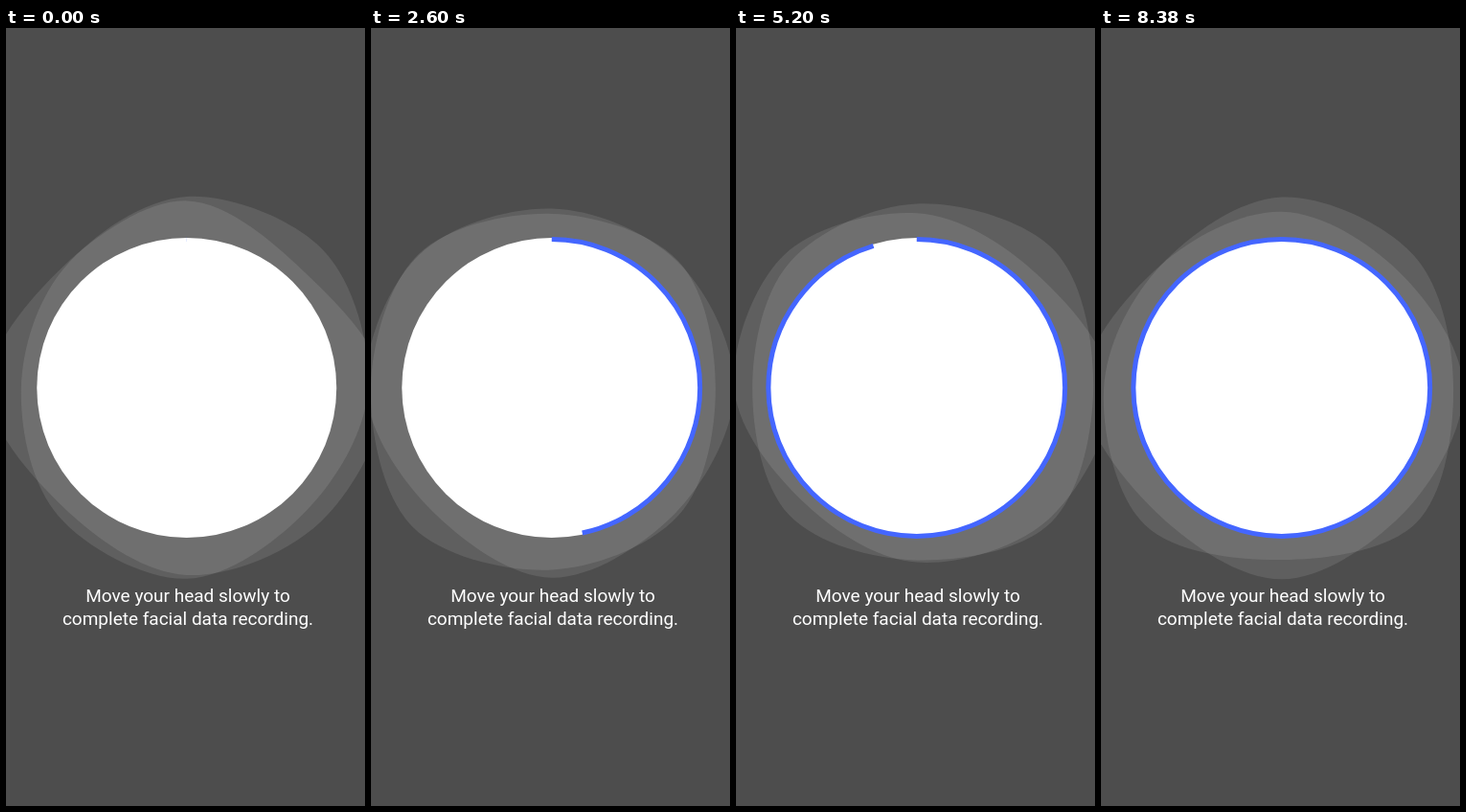
These frames come from a looping animation (375x812 px, 8.4 s). An HTML page:

```html
<!DOCTYPE html>
<html lang="en">
<head>
<meta charset="utf-8">
<title>Face scan</title>
<style>
  html, body { margin: 0; width: 100%; height: 100%; overflow: hidden; background: #4d4d4d; }
  svg { display: block; width: 375px; height: 812px; }
  .blob { fill: #fff; fill-opacity: .1; }
  .ring {
    fill: none;
    stroke: #4466ff;
    stroke-width: 5;
    stroke-dasharray: 360 720;
    animation: scan 8400ms infinite;
  }
  text { font: 400 19px Roboto, Inter, sans-serif; fill: #fff; text-anchor: middle; }

  /* The dash offset is the part of the turn still open, in degrees */
  @keyframes scan {
    0% { stroke-dashoffset: 360; animation-timing-function: cubic-bezier(.333, .234, .667, .655); }
    30.95% { stroke-dashoffset: 192; animation-timing-function: cubic-bezier(.333, .347, .667, 1); }
    53.2% { stroke-dashoffset: 72; animation-timing-function: cubic-bezier(.37, 0, .63, 1); }
    66.1%, 100% { stroke-dashoffset: 0; }
  }
</style>
</head>
<body>
<svg viewBox="0 0 375 812">
  <path class="blob"/>
  <path class="blob"/>
  <circle cx="188.75" cy="375.5" r="156.5" fill="#fff"/>
  <circle class="ring" cx="188.75" cy="375.5" r="154.9" pathLength="360" transform="rotate(-90 188.75 375.5)"/>
  <text x="190" y="599">Move your head slowly to</text>
  <text x="190" y="623">complete facial data recording.</text>
</svg>
<script>
const LOOP = 8.4, CX = 188.75, CY = 375.5, TAU = Math.PI * 2;
const RADIUS = 189, SWING = 10;

// rest: how far each blob at rest departs from a circle, at angle a from the top.
// swings: [period, time of a peak] in seconds for each point, clockwise from the top.
const blobs = [
  {
    rest: a => 4.5 * Math.cos(2 * a) + 4 * Math.sin(2 * a) - 4 * Math.cos(4 * a),
    swings: [[4.3, 0], [7.5, 6.3], [7, 6.5], [3.35, 1.7], [3.3, 3.4], [5.4, 2.1], [5.4, 2.1], [4.3, 2.15]]
  },
  {
    rest: a => -3 * Math.cos(2 * a) - 7 * Math.sin(2 * a) + 6 * Math.cos(4 * a),
    swings: [[3, .6], [8.4, 2.6], [5.6, .5], [5.6, .6], [7.7, 1.5], [6.5, 1.3], [8.4, 0], [8.8, 3.9]]
  }
];

function blobPoints({ rest, swings }, t) {
  return swings.map(([period, peak], i) => {
    const a = i * TAU / swings.length;
    const r = RADIUS + rest(a) + SWING * Math.cos(TAU * (t - peak) / period);
    return [CX + r * Math.sin(a), CY - r * Math.cos(a)];
  });
}

// Closed cardinal spline through the points
function spline(points) {
  const n = points.length, at = i => points[(i + n) % n];
  const handle = (i, side) =>
    at(i).map((v, axis) => v + side * (at(i + 1)[axis] - at(i - 1)[axis]) / 6);
  const curves = points.map((_, i) => "C" + [handle(i, 1), handle(i + 1, -1), at(i + 1)].join(" "));
  return "M" + at(0) + curves.join("") + "Z";
}

const paths = document.querySelectorAll(".blob");
const start = performance.now();

function draw() {
  const t = (performance.now() - start) / 1000 % LOOP;
  blobs.forEach((blob, i) => paths[i].setAttribute("d", spline(blobPoints(blob, t))));
  requestAnimationFrame(draw);
}
draw();
</script>
</body>
</html>
```
